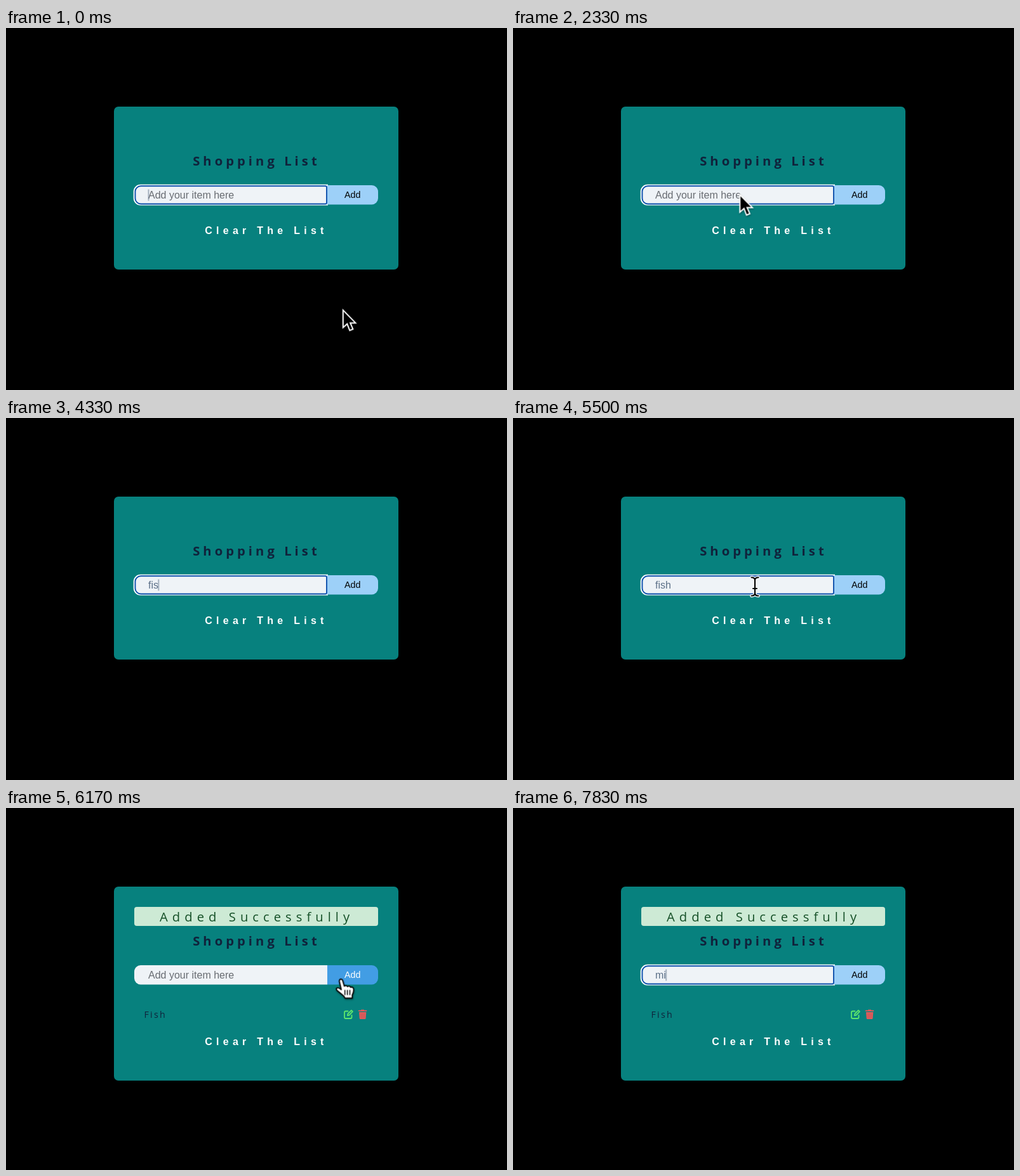
An HTML page for the animation above (8 s loop, 789x571 px).

```html
<!DOCTYPE html>
<html lang="en">
<head>
<meta charset="utf-8">
<title>Shopping List</title>
<style>
html, body { margin: 0; width: 100%; height: 100%; overflow: hidden; background: #000; }
svg { display: block; width: 789px; height: 571px; }

.sans { font-family: "Open Sans", sans-serif; }
.ui { font-family: "Liberation Sans", Arial, sans-serif; }
.ink { fill: #10223b; }

/* One 8 s loop; every change is a hard cut, so 1% is 80 ms. */
.anim { animation: 8s step-end infinite; }

#card { animation-name: grow; }
#clear { animation-name: drop; }
.added { animation-name: added; }
#ring { animation-name: focus; }
#popup { animation-name: popup; }
#hint { animation-name: hint; }
#button { animation-name: hover; }
#label { animation-name: hover-label; }
#caret { animation-name: caret-blink, caret-move; }
#arrow { animation-name: arrow; }
#beam { animation-name: beam; }
#hand { animation-name: hand; }
.k1 { animation-name: key1; }
.k2 { animation-name: key2; }
.k3 { animation-name: key3; }
.k4 { animation-name: key4; }
.k5 { animation-name: key5; }
.k6 { animation-name: key6; }

@keyframes grow { 0% { height: 257px; } 77.125%, to { height: 306px; } }
@keyframes drop { 0% { transform: none; } 77.125%, to { transform: translateY(49px); } }
@keyframes added { 0% { visibility: hidden; } 77.125%, to { visibility: visible; } }
@keyframes focus {
  0%, 81.25%, to { visibility: visible; }
  77.125% { visibility: hidden; }
}
@keyframes popup {
  0%, 93.75%, to { visibility: hidden; }
  81.25% { visibility: visible; }
}
@keyframes hint {
  0%, 77.125% { visibility: visible; }
  47.875%, 93.75%, to { visibility: hidden; }
}

@keyframes key1 { 0%, 77.125%, to { visibility: hidden; } 47.875% { visibility: visible; } }
@keyframes key2 { 0%, 77.125%, to { visibility: hidden; } 52.125% { visibility: visible; } }
@keyframes key3 { 0%, 77.125%, to { visibility: hidden; } 54.125% { visibility: visible; } }
@keyframes key4 { 0%, 77.125%, to { visibility: hidden; } 60.375% { visibility: visible; } }
@keyframes key5 { 0% { visibility: hidden; } 93.75%, to { visibility: visible; } }
@keyframes key6 { 0% { visibility: hidden; } 97.875%, to { visibility: visible; } }

@keyframes caret-blink {
  0%, 33.375%, 45.875%, 72.875%, 81.25%, 93.75%, to { visibility: visible; }
  29.125%, 39.625%, 66.625%, 77.125%, 87.5% { visibility: hidden; }
}
@keyframes caret-move {
  0%, 77.125% { transform: translateX(224.5px); }
  47.875% { transform: translateX(229px); }
  52.125% { transform: translateX(232.5px); }
  54.125% { transform: translateX(240.3px); }
  60.375% { transform: translateX(249.2px); }
  93.75% { transform: translateX(237.7px); }
  97.875%, to { transform: translateX(241.2px); }
}

@keyframes hover {
  0%, 81.25%, to { fill: #9dd0f8; }
  72.875%, 79.125% { fill: #70b7ee; }
  75% { fill: #429de4; }
}
@keyframes hover-label {
  0%, 81.25%, to { fill: #000; }
  72.875%, 79.125% { fill: #888; }
  75% { fill: #fff; }
}

@keyframes arrow {
  0% { transform: translate(529px, 442.5px); visibility: visible; }
  2.125% { transform: translate(420px, 330px); visibility: visible; }
  4.125% { transform: translate(355.5px, 260.5px); visibility: visible; }
  47.875%, to { transform: translate(355.5px, 260.5px); visibility: hidden; }
}
@keyframes beam {
  0%, 72.875%, 93.75%, to { transform: translate(367px, 269px); visibility: hidden; }
  68.75% { transform: translate(381px, 266px); visibility: visible; }
  70.875% { transform: translate(452px, 267px); visibility: visible; }
  79.125% { transform: translate(436px, 270px); visibility: visible; }
  81.25% { transform: translate(367px, 269px); visibility: visible; }
}
@keyframes hand {
  0%, 79.125%, to { transform: translate(519px, 269px); visibility: hidden; }
  72.875% { transform: translate(524px, 269px); visibility: visible; }
  75% { transform: translate(532px, 270px); visibility: visible; }
  77.125% { transform: translate(518.5px, 268.5px); visibility: visible; }
}
</style>
</head>
<body>
<svg viewBox="0 0 789 571">
  <defs>
    <filter id="shade" x="-30%" y="-30%" width="170%" height="170%">
      <feDropShadow dx="0.5" dy="1.5" stdDeviation="1.2" flood-opacity=".4"/>
    </filter>
  </defs>
  <rect width="789" height="571"/>
  <rect id="card" class="anim" x="170" y="124" width="448" height="257" rx="7" fill="#07817e"/>

  <g class="anim added">
    <rect x="202" y="156" width="384" height="30" rx="4" fill="#cdead5"/>
    <text class="sans" x="242" y="178.5" font-size="20.2" letter-spacing="7.05" fill="#155027">Added Successfully</text>
  </g>
  <text class="sans ink" x="294.2" y="216.5" font-size="20.2" font-weight="700" letter-spacing="5.05">Shopping List</text>

  <!-- input field -->
  <path d="M506 248V278.5H212a10 10 0 0 1-10-10V258a10 10 0 0 1 10-10Z" fill="#eff3f7"/>
  <g id="ring" class="anim" fill="none">
    <path d="M507 247.5H212a10.5 10.5 0 0 0-10.5 10.5v10.5a10.5 10.5 0 0 0 10.5 10.5H507" stroke="#fff" stroke-width="1.6"/>
    <path d="M212.500 249.200H503a2 2 0 0 1 2 2V275.500a2 2 0 0 1-2 2H212.500a9 9 0 0 1-9-9V258.200a9 9 0 0 1 9-9Z" stroke="#0d50ad" stroke-width="1.900"/>
  </g>
  <path id="button" class="anim" d="M506 248h70a10 10 0 0 1 10 10v10.500a10 10 0 0 1-10 10h-70Z" fill="#9dd0f8"/>
  <text id="label" class="ui anim" x="545.8" y="268.300" font-size="14.300" text-anchor="middle">Add</text>

  <g class="ui" font-size="16">
    <text id="hint" class="anim" x="224" y="268.700" fill="#686c72">Add your item here</text>
    <g fill="#5c7088">
      <text x="224" y="268.700"><tspan class="anim k1">f</tspan><tspan class="anim k2">i</tspan><tspan class="anim k3">s</tspan><tspan class="anim k4">h</tspan></text>
      <text x="224" y="268.700"><tspan class="anim k5">m</tspan><tspan class="anim k6">i</tspan></text>
    </g>
  </g>
  <path id="caret" class="anim" d="M0 254.500v18" stroke="#5c7088"/>

  <text id="clear" class="ui anim" x="313.300" y="325.300" font-size="16" font-weight="700" letter-spacing="6.250" fill="#fff">Clear The List</text>

  <!-- list row -->
  <g class="anim added">
    <text class="sans ink" x="217.500" y="330.800" font-size="14.200" letter-spacing="2.300">Fish</text>
    <g fill="none" stroke="#5ee76c" stroke-width="1.800" stroke-linecap="round" stroke-linejoin="round">
      <path d="M538.500 320.500h-3.500a2 2 0 0 0-2 2v7.500a2 2 0 0 0 2 2h7.500a2 2 0 0 0 2-2v-3"/>
      <path d="M537.800 327.300l.7-2.800 5.400-5.300 2 2-5.300 5.400Z"/>
    </g>
    <g fill="#e05a5a">
      <path d="M555 319h3.700l.8-1h4.200l.8 1h3.700v1.800h-13.200Z"/>
      <path d="M556 322h11.300l-.7 9.500a1.500 1.500 0 0 1-1.500 1.500h-6.900a1.500 1.500 0 0 1-1.500-1.500Z"/>
      <path d="M559.200 324v7M561.700 324v7M564.200 324v7" stroke="#b9605f" stroke-width=".8"/>
    </g>
  </g>

  <g id="popup" class="anim" filter="url(#shade)">
    <path d="M307 287h4.500l8-7.500q1.800-1.600 3.600 0l8 7.500H451a6 6 0 0 1 6 6V325a6 6 0 0 1-6 6H307a6 6 0 0 1-6-6V293a6 6 0 0 1 6-6Z" fill="#1e1e1e"/>
    <text class="ui" x="313" y="314" font-size="14" letter-spacing=".4" fill="#ececec">fish</text>
  </g>

  <!-- pointers -->
  <g id="arrow" class="anim" filter="url(#shade)">
    <path d="M1.800 2.500V30L8.300 24.200 12.300 34.500 17.400 32.400 13.100 22.700H21.500Z" stroke="#fff" stroke-width="1.900"/>
  </g>
  <g id="beam" class="anim" fill="none" stroke-linecap="round">
    <path id="stem" d="M-5.500-14.500Q0-14.500 0-10V10Q0 14.500-5.500 14.500M5.500-14.500Q0-14.500 0-10M0 10Q0 14.500 5.500 14.500M-3 3H3" stroke="#fff" stroke-width="4.400"/>
    <use href="#stem" style="stroke:#000"/>
    <path d="M-5.500-14.500Q0-14.500 0-10V10Q0 14.500-5.500 14.500M5.500-14.500Q0-14.500 0-10M0 10Q0 14.500 5.500 14.500M-3 3H3" stroke="#000" stroke-width="2.200"/>
  </g>
  <g id="hand" class="anim" filter="url(#shade)" stroke="#000" stroke-linecap="round" stroke-linejoin="round">
    <path d="M6.500 5Q6.300 1.500 8.800 1.300 11 1.300 11.800 4L14.300 12.500Q17.500 10.300 19.300 13.200 22.300 11.200 24.200 14.300 28.500 13 29 17.500 29.300 22 26.800 26.500V31.500H15.500Q14.500 28.500 11 26L3 19.500Q.8 17 2.500 15.500 4.500 14.300 7.500 16.500L9.500 18Z" fill="#fff" stroke-width="1.800"/>
    <path d="M15.300 19v7M19.200 19v7M23 19v7" fill="none" stroke-width="1.500"/>
  </g>
</svg>
</body>
</html>
```
